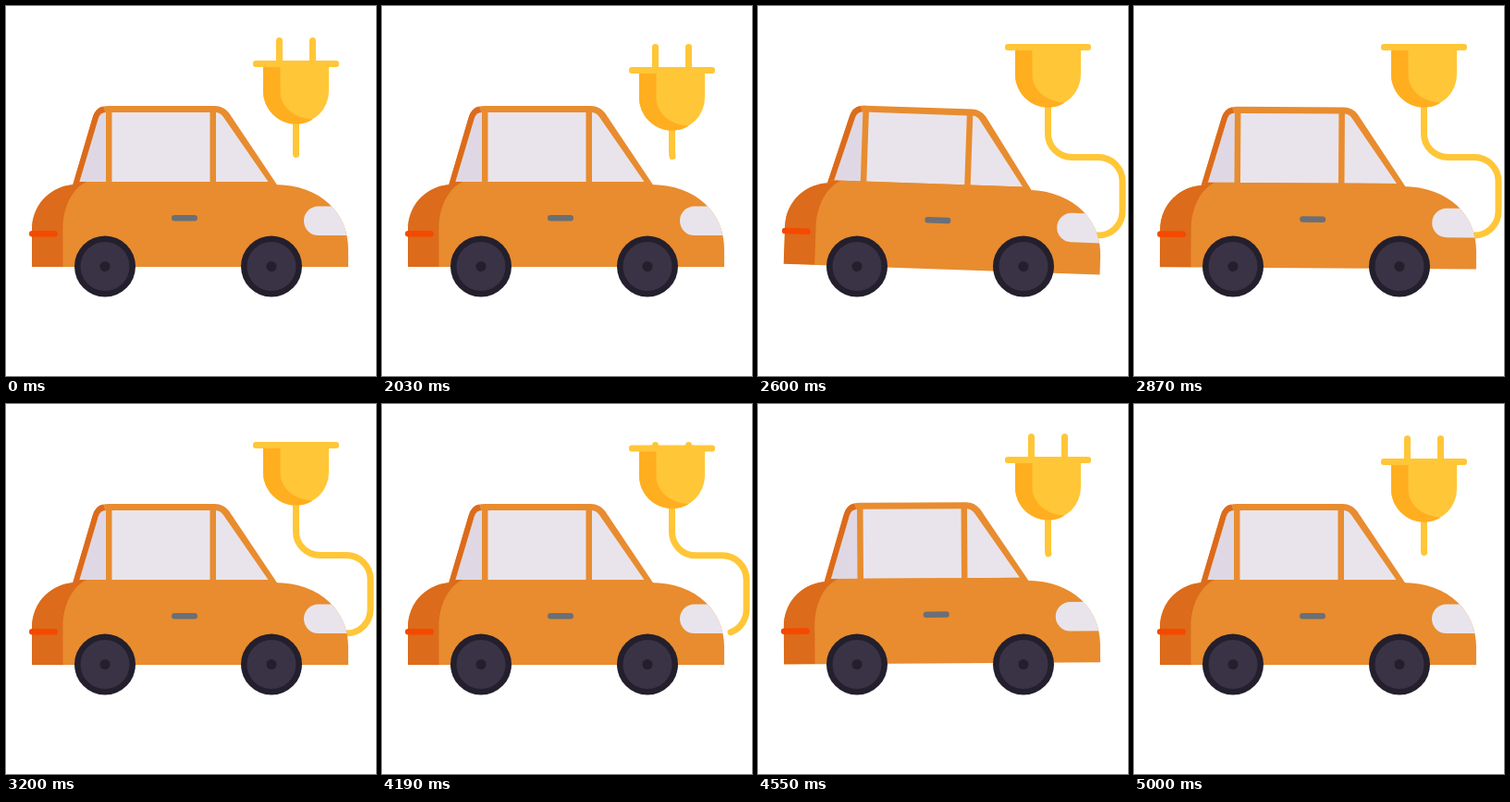
An HTML page for the animation above (5.03 s loop, 400 by 400 pixels).

```html
<!DOCTYPE html>
<html lang="en">
<head>
<meta charset="utf-8">
<title>Electric car</title>
<style>
html, body { margin: 0; width: 100%; height: 100%; overflow: hidden; background: #fff; }
svg { display: block; width: 100%; height: 100%; }
</style>
</head>
<body>
<svg viewBox="0 0 400 400">
  <defs>
    <clipPath id="shell">
      <path id="hull" d="M28 282V241A48 48 0 0 1 76 193V190H290V193C342 193 370 226 370 262V282Z"/>
    </clipPath>
    <g id="wheel">
      <circle r="33" fill="#231f2d"/>
      <circle r="26.5" fill="#3a3345"/>
      <circle r="5.5" fill="#231f2d"/>
    </g>
  </defs>

  <path id="cord" fill="none" stroke="#ffc637" stroke-width="7" stroke-linecap="round"/>
  <g fill="#ffc637">
    <rect id="pinL" x="292" width="7" rx="3.5"/>
    <rect id="pinR" x="328" width="7" rx="3.5"/>
  </g>
  <g id="plug">
    <path fill="#ffc637" d="M278 65H349V92A35.5 35.5 0 0 1 278 92Z"/>
    <path fill="#ffae20" d="M278 65H296.5V92C296.5 108 310 121 331.5 122.7A35.5 35.5 0 0 1 278 92Z"/>
    <rect x="267" y="59" width="93" height="7" rx="3" fill="#ffc637"/>
  </g>

  <g id="car">
    <path fill="#e88c2f" d="M72 194L93.5 121Q97 108 111 108H226Q235 108 241 115.5L293.5 194Z"/>
    <path fill="#dc6b1b" d="M72 194L93.5 121Q96.5 110 105 108.6L107 115Q102 116 100 121L78 194Z"/>
    <path fill="#dfd8e4" d="M79.5 190L100 121Q102 115 108 115V190Z"/>
    <path fill="#e9e4ec" d="M114.5 115H220.5V190H114.5ZM227 115Q232 115.5 235 120L283.5 190H227Z"/>
    <use href="#hull" fill="#e88c2f"/>
    <g clip-path="url(#shell)">
      <path fill="#dc6b1b" d="M20 282V190H87C72 197 61.5 217 61.5 241V282Z"/>
      <rect x="322" y="216.5" width="70" height="31.5" rx="15.75" fill="#e9e4ec"/>
    </g>
    <rect x="179" y="226" width="28" height="6.5" rx="3.2" fill="#697077"/>
    <rect x="25" y="243" width="31" height="6.5" rx="3.2" fill="#f64900"/>
  </g>
  <use href="#wheel" x="107" y="281.5"/>
  <use href="#wheel" x="287" y="281.5"/>
</svg>
<script>
const LOOP = 5030, STEP = 30;
const PLUG_IN = 2000, JOLT = 2390, PLUG_OUT = 4160;
const SHAKE = 810;
const $ = id => document.getElementById(id);
const clamp = u => Math.min(1, Math.max(0, u));
const ease = u => (1 - Math.cos(Math.PI * clamp(u))) / 2;
const wave = (s, period) => Math.sin(2 * Math.PI * s / period);

// The plug dips, rises into place, and later springs back to rest.
function plugShift(t) {
  if (t < PLUG_OUT) return 7 * ease((t - PLUG_IN) / 30) - 25 * ease((t - PLUG_IN - 30) / 360);
  const s = t - PLUG_OUT;
  return -18 * Math.cos(2 * Math.PI * s / 390) * (1 - clamp(s / 510)) ** 1.5;
}

// 0 is a short straight stub, 1 reaches behind the car.
function cordReach(t) {
  return t < PLUG_OUT ? ease((t - PLUG_IN) / 420) : (1 - clamp((t - PLUG_OUT) / 430)) ** 2;
}

// The body bounces and rocks, fading out evenly.
function carPose(t) {
  const s = t - (t < PLUG_OUT ? JOLT : PLUG_OUT + STEP);
  const fade = s < 0 ? 0 : 1 - clamp(s / SHAKE);
  return { y: -3.5 * fade * wave(s, 270), tilt: -3.4 * fade * wave(s, 245) };
}

function setPin(pin, top, bottom) {
  pin.setAttribute('y', top);
  pin.setAttribute('height', bottom - top);
}

function draw(ms) {
  const t = Math.max(0, 20 + STEP * Math.floor((ms % LOOP - 20) / STEP));

  const dy = plugShift(t);
  const seated = t > PLUG_IN + STEP && t < PLUG_OUT + 200;
  const top = 34 + (seated ? 7 : dy);
  $('plug').setAttribute('transform', `translate(0 ${dy})`);
  for (const id of ['pinL', 'pinR']) setPin($(id), top, 66 + dy);

  const reach = cordReach(t);
  const bend = 138 + 20 * (1 - reach) ** 2;
  $('cord').setAttribute('d', `M313.5 100V${bend}a26 25.5 0 0 0 26 25.5h28.5a26 26 0 0 1 26 26v32.5a26 26 0 0 1 -26 26h-30`);
  $('cord').setAttribute('stroke-dasharray', `${60.5 + 174.5 * reach} 600`);

  const { y, tilt } = carPose(t);
  $('car').setAttribute('transform', `translate(0 ${y}) rotate(${tilt} 199 270)`);
}

let start;
function tick(now) {
  start ??= now;
  draw(now - start);
  requestAnimationFrame(tick);
}
draw(0);
requestAnimationFrame(tick);
</script>
</body>
</html>
```
